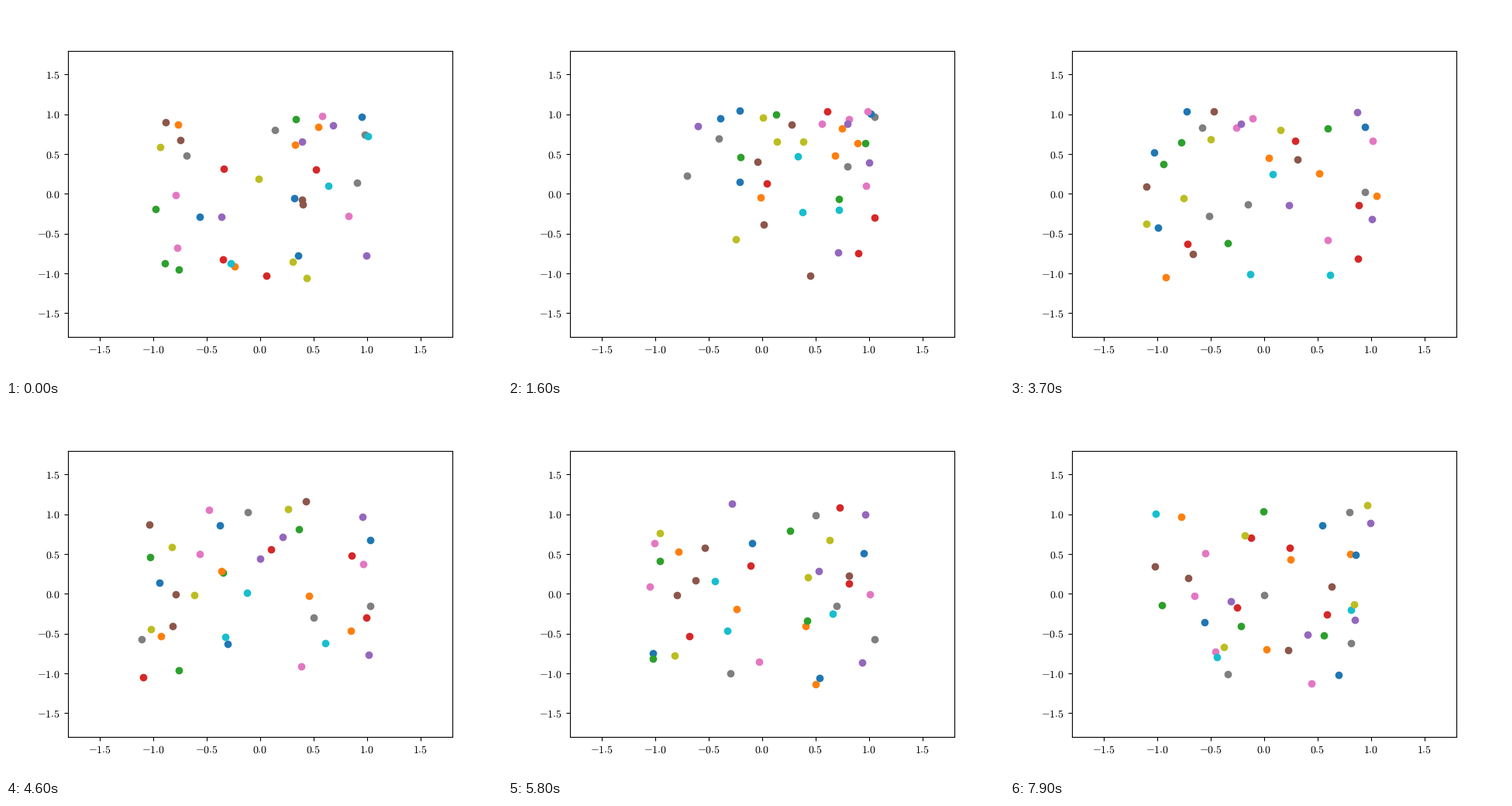
Write a matplotlib script that moves like this. It is 640x480 px and loops after 8 s.

```python
import numpy as np
import matplotlib.pyplot as plt
from matplotlib.animation import FuncAnimation

plt.rcParams.update({
    "mathtext.fontset": "cm",
    "text.hinting": "no_hinting",
})

COUNT = 39
FRAMES = 80
STEPS = 10          # integration steps per frame
CHARGE = 5e-5       # strength of the mutual repulsion
SOFT = 0.015        # keeps very close pairs from flying apart
WALL = 0.3          # stiffness of the box at +-1


def push(pos):
    """Inverse-square repulsion between all dots, plus springy walls."""
    gap = pos[:, None] - pos
    dist2 = (gap ** 2).sum(-1) + SOFT ** 2
    repel = CHARGE * (gap / dist2[..., None] ** 1.5).sum(1)
    return repel - WALL * (pos - pos.clip(-1, 1))


def simulate(frames, seed=3):
    """Release a resting gas from the upper right quarter of the box."""
    pos = np.random.default_rng(seed).random((COUNT, 2))
    vel = np.zeros_like(pos)
    dt = 1 / STEPS
    poses = []
    for _ in range(frames):
        poses.append(pos.copy())
        for _ in range(STEPS):
            vel += push(pos) * dt
            pos += vel * dt
    return poses


# The loop opens on the fully mixed gas, then cuts to the release.
run = simulate(2 * FRAMES)
poses = [run[-1]] + run[:FRAMES - 1]

fig, ax = plt.subplots(figsize=(6.4, 4.8), dpi=100)
ax.set(xlim=(-1.8, 1.8), ylim=(-1.8, 1.8))
ticks = np.arange(-1.5, 1.6, 0.5)
labels = [f"${t:.1f}$" for t in ticks]
ax.set_xticks(ticks, labels)
ax.set_yticks(ticks, labels)
dots = [ax.plot([], [], "o")[0] for _ in range(COUNT)]


def draw(i):
    for dot, (x, y) in zip(dots, poses[i]):
        dot.set_data([x], [y])
    return dots


anim = FuncAnimation(fig, draw, frames=FRAMES, interval=100,
                     repeat=True, repeat_delay=0)
plt.show()
```
